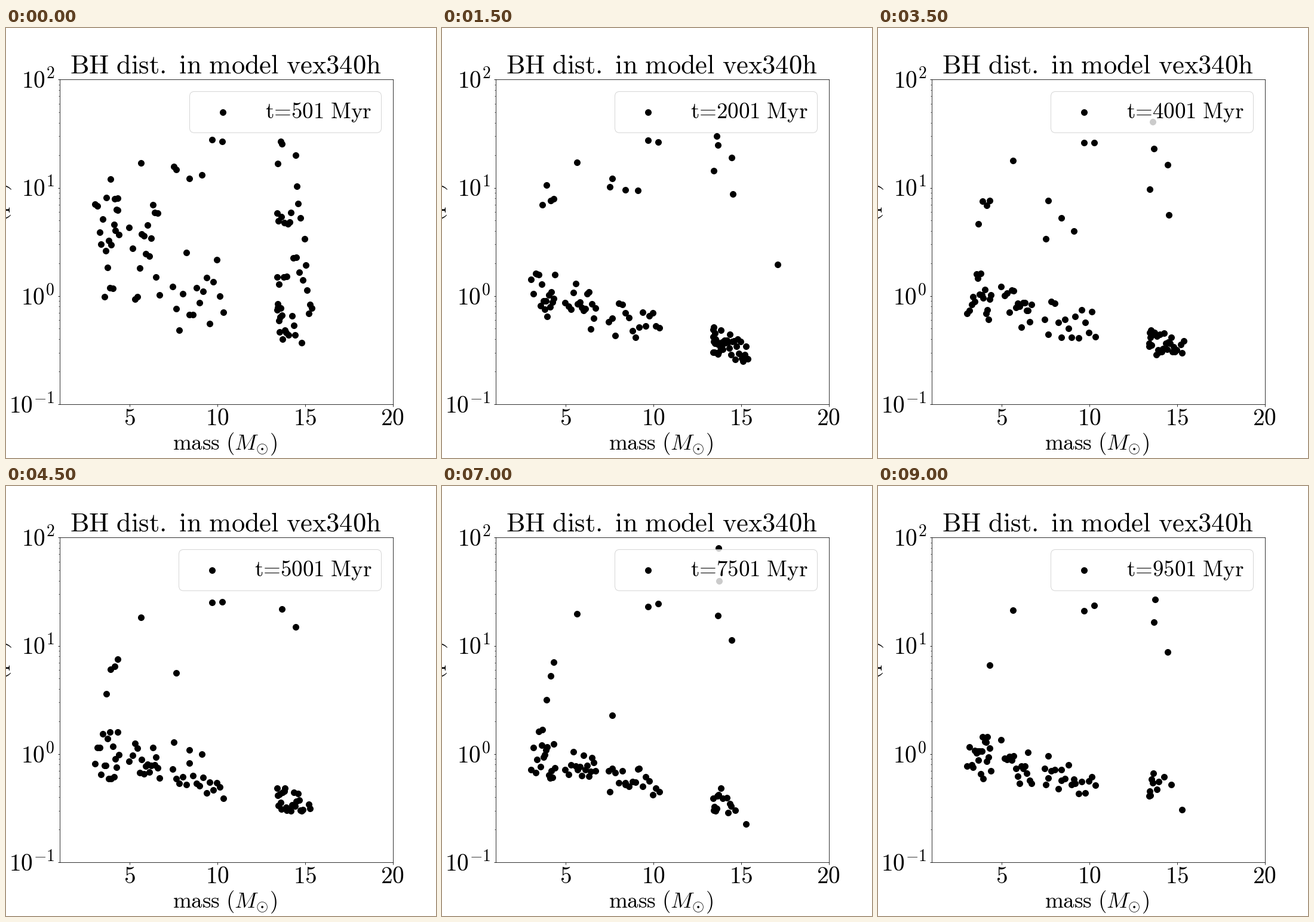
Write a matplotlib script that moves like this. It is 720 by 720 pixels and loops after 9.5 s.

```python
import matplotlib.pyplot as plt
import numpy as np
from matplotlib.animation import FuncAnimation
from matplotlib.patches import FancyBboxPatch

plt.rcParams["mathtext.fontset"] = "cm"

SIZE, DPI = 720, 72
FRAMES, STEP = 19, 500
END = FRAMES - 1
rng = np.random.default_rng(12)


class Hole:
    """A black hole that drifts from y0 to y1, then settles into the core."""

    def __init__(self, x, first, last, y0, y1, gone=np.inf):
        self.x, self.first, self.last, self.gone = x, first, last, gone
        self.y0, self.y1 = y0, y1
        spread = np.interp(x, [150, 250, 340, 460], [26, 20, 15, 13])
        self.noise = np.clip(rng.normal(0, spread, FRAMES), -1.6 * spread, 1.6 * spread)

    def core(self, i):
        lift = 6 * max(0, i - 14) if self.x > 400 else 0
        return core_depth(self.x) - lift + self.noise[i]

    def y(self, i):
        if i <= self.last:
            p = (i - self.first) / max(self.last - self.first, 1)
            return self.y0 + (self.y1 - self.y0) * p ** 1.5
        sink = min((i - self.last) / 3, 1)
        return self.y1 + (self.core(i) - self.y1) * sink

    def alive(self, i):
        return self.first <= i < self.gone


def core_depth(x):
    """Heavier holes sit deeper."""
    return np.interp(x, [150, 190, 250, 300, 365, 455, 510],
                     [452, 450, 472, 490, 500, 522, 545])


def swarm(count, lo, hi, skew, depth, fades=False):
    """Holes spread over a mass range that start up to `depth` above the core."""
    for u in np.linspace(0, 1, count):
        x = lo + (hi - lo) * u ** skew
        start = core_depth(x) + rng.normal(0, 8) - depth * rng.random() ** 1.5
        gone = 2 + rng.exponential(14) if fades else np.inf
        yield Hole(x, 0, 0, start, start, gone)


holes = [*swarm(17, 149, 189, 0.8, 170), *swarm(16, 206, 257, 0.8, 170),
         *swarm(16, 279, 364, 1, 110), *swarm(39, 454, 512, 1.7, 250, fades=True)]

# Wide orbits: x, first step, last step, y at both
for x, first, last, y0, y1 in [
    (168, 0, 14, 284, 408), (175, 0, 14, 253, 358), (182, 0, 14, 286, 318),
    (187, 0, END, 285, 300), (226, 0, END, 226, 208), (281, 0, 7, 232, 353),
    (285, 0, END, 237, 452), (307, 0, 7, 252, 318), (328, 0, 7, 246, 340),
    (345, 0, END, 187, 209), (362, 0, END, 190, 200), (455, 0, 7, 227, 270),
    (460, 0, 8, 190, 150), (462, 0, END, 194, 228), (485, 0, END, 213, 278),
    (487, 0, 7, 265, 313), (562, 3, 6, 396, 340), (463, 13, 14, 129, 104),
    (464, 14, END, 159, 190),
]:
    holes.append(Hole(x, first, last, y0, y1, last + 1 if x > 400 else np.inf))


def roman(s):
    s = s.replace(" ", r"\ ").replace("=", r"\hspace{-0.2}=\hspace{-0.2}")
    return rf"$\mathrm{{{s}}}$"


fig, ax = plt.subplots(figsize=(SIZE / DPI, SIZE / DPI), dpi=DPI, facecolor="white")
fig.subplots_adjust(left=0.125, right=0.9, bottom=0.125, top=0.88)
ax.set(xlim=(1, 20), ylim=(0.1, 100), yscale="log", xticks=[5, 10, 15, 20])
ax.tick_params(which="both", labelleft=False, labelbottom=False)

# Overlay measured in stage pixels, y downwards
stage = fig.add_axes([0, 0, 1, 1])
stage.set(xlim=(0, SIZE), ylim=(SIZE, 0))
stage.axis("off")


def label(x, y, s, size, ha="center", **kw):
    return stage.text(x, y, s, fontsize=size, ha=ha, va="baseline", **kw)


label(367.5, 76, roman("BH dist. in model vex340h"), 44.5)
label(366.5, 706, r"$\mathrm{mass}\ (M_{\odot})$", 37)
label(0, 260, roman("radius (pc)"), 37, "right", rotation=90, rotation_mode="anchor")
for m in (5, 10, 15, 20):
    label(89.3 + (m - 1) * 558 / 19, 665, f"${m}$", 39.5)
for p in (-1, 0, 1, 2):
    label(81.5, 463.3 - 181.2 * p, f"$10^{{{p}}}$", 39.5, "right")

dots = stage.scatter([], [], s=100, c="black", zorder=2)
frame = FancyBboxPatch((289, 106.4), 339, 69, boxstyle="round,pad=0,rounding_size=8",
                       fc="white", ec="0.8", lw=1, alpha=0.8, zorder=3)
stage.add_patch(frame)
key = stage.scatter([], [], s=100, c="black", zorder=4)
clock = label(416, 151.5, "", 37, "left", zorder=4)


def update(i):
    t = 501 + 500 * i
    left = 307.5 if t < 1000 else 289.5
    dots.set_offsets([(h.x, h.y(i)) for h in holes if h.alive(i)])
    frame.set_x(left)
    frame.set_width(628.5 - left)
    key.set_offsets([(left + 55.5, 141)])
    clock.set_x(left + 127)
    clock.set_text(roman(f"t={t} Myr"))
    return dots, frame, key, clock


anim = FuncAnimation(fig, update, frames=FRAMES, interval=STEP, repeat=True,
                     repeat_delay=0)
plt.show()
```
